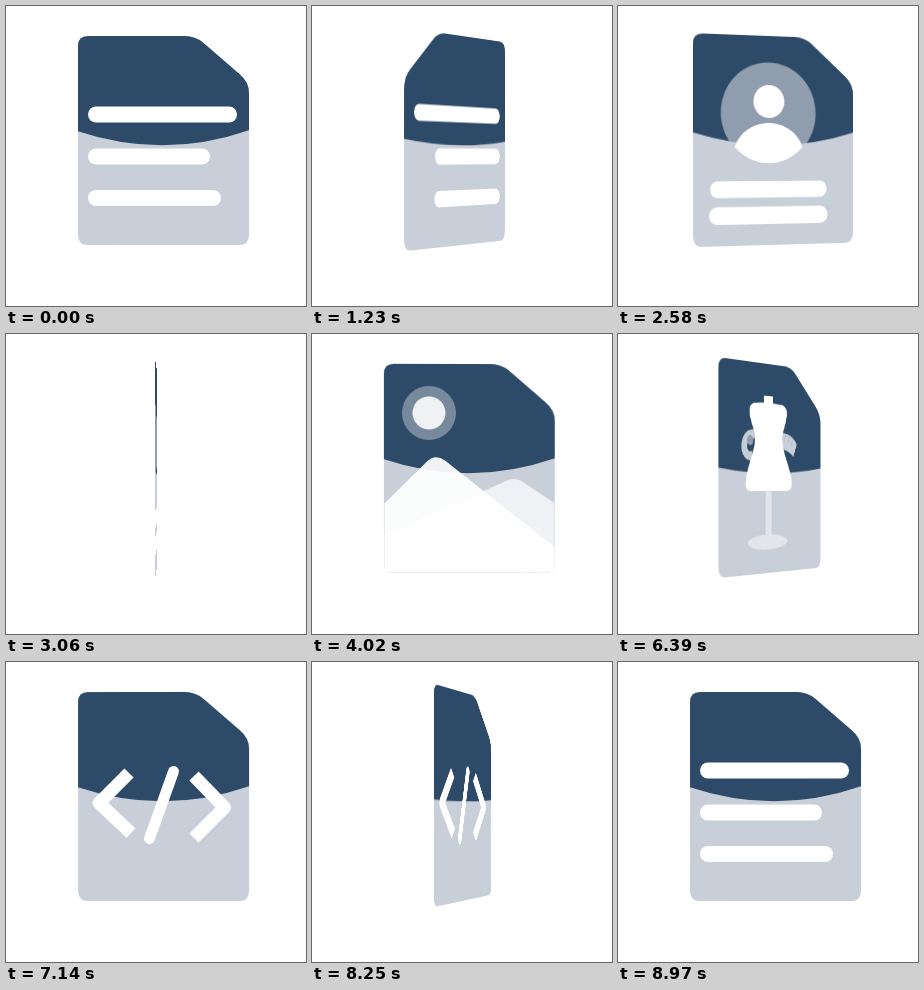
Write an HTML page that moves like this. It is 300x300 px and loops after 9 s.

```html
<!DOCTYPE html>
<html lang="en">
<head>
<meta charset="utf-8">
<title>Turning file card</title>
<style>
html, body { margin: 0; width: 100%; height: 100%; overflow: hidden; background: #fff; }
#stage { position: relative; width: 300px; height: 300px; perspective: 1150px; perspective-origin: 150px 150px; }
#card { position: absolute; left: 0; top: 0; width: 300px; height: 300px; transform-origin: 150px 150px; will-change: transform; }
.face { display: none; }
.face.on { display: inline; }
.stroke { fill: none; stroke: #fff; stroke-width: 13; stroke-linecap: butt; stroke-linejoin: round; }
</style>
</head>
<body>
<div id="stage">
<svg id="card" viewBox="0 0 300 300">
  <defs>
    <clipPath id="sheet">
      <path d="M82 30H179Q189 30 197 36.500L234 68.500Q243 76 243 87V229Q243 239 233 239H82Q72 239 72 229V40Q72 30 82 30Z"/>
    </clipPath>
  </defs>
  <g clip-path="url(#sheet)">
    <rect x="72" y="30" width="171" height="209" fill="#c9cfd8"/>
    <path id="top" fill="#2d4a68"/>
  </g>

  <g class="face" fill="#fff">
    <rect class="bar" x="82" y="100.500" height="16" rx="8"/>
    <rect class="bar" x="82" y="142.500" height="16" rx="8"/>
    <rect class="bar" x="82" y="184" height="16" rx="8"/>
  </g>

  <g class="face" fill="#fff">
    <circle cx="151" cy="107" r="50.500" fill="#c9cfd8" opacity=".63"/>
    <circle cx="151" cy="95.500" r="16.500"/>
    <path d="M115 141C120 126 135 117 151 117S182 126 187 141A48 48 0 0 1 115 141Z"/>
    <rect x="89.500" y="175" width="124" height="16.500" rx="8"/>
    <rect x="88.500" y="200.500" width="126" height="17.500" rx="8.500"/>
  </g>

  <g class="face" clip-path="url(#sheet)">
    <circle cx="117" cy="79" r="27" fill="#fff" opacity=".35"/>
    <circle cx="117" cy="79" r="16.500" fill="#eff1f3"/>
    <path d="M72.500 200L192 148Q202 142 211 148L242.500 169V238.500H72.500Z" fill="#eff1f4"/>
    <path d="M72.500 169.500L115 127.500Q123 119.500 133 126.500L242.500 213V238.500H72.500Z" fill="#fff" opacity=".93"/>
  </g>

  <g class="face">
    <path d="M129 101C107 98 106 126 125 122" fill="none" stroke="#c5ccd5" stroke-width="9"/>
    <circle cx="121" cy="107" r="5" fill="#8f9dae"/>
    <path d="M168 98Q190 97 199.500 109L193.500 122Q184 115 170 114Z" fill="#c9cfd8"/>
    <path d="M180 99L178 106M187 101L184 108M193 104L189 111" stroke="#aab4c1" stroke-width="1"/>
    <rect x="146" y="155" width="10" height="52" fill="#e2e5e9"/>
    <ellipse cx="150" cy="208" rx="33" ry="7.500" fill="#e2e5e9"/>
    <path d="M143 62H158V69L175 70Q183 72 182 80C180 91 174 97 174 105C175 119 187 132 190.500 146Q192 157 182 157H123Q112 157 114 146C117 131 128 119 129 105C129 97 122 91 120 80Q119 72 127 70L143 69Z" fill="#fff"/>
  </g>

  <g class="face">
    <path class="stroke bracket" d="M123 111L93 141L125 171"/>
    <path class="stroke" d="M167.500 109.500L143.500 176.500" style="stroke-width:11;stroke-linecap:round"/>
    <path class="stroke bracket" d="M188 114L218.500 145.500L188 176"/>
  </g>
</svg>
</div>
<script>
const LOOP = 9000, CYCLE = 1800, START = 262, TURN = 1560;
const card = document.getElementById('card');
const topHalf = document.getElementById('top');
const faces = [...document.querySelectorAll('.face')];
const brackets = [...document.querySelectorAll('.bracket')];
const bars = [...document.querySelectorAll('.bar')];
const barSizes = [[149, 3], [122, 9], [133, 19]]; // full width, shrink

const clamp = v => Math.min(1, Math.max(0, v));
const smooth = v => { v = clamp(v); return v * v * (3 - 2 * v); };
const bez = (u, a, b) => 3 * (1 - u) * (1 - u) * u * a + 3 * (1 - u) * u * u * b + u * u * u;

// Slow start, very fast middle, soft landing.
function ease(x) {
  if (x <= 0 || x >= 1) return clamp(x);
  let lo = 0, hi = 1;
  for (let i = 0; i < 30; i++) {
    const mid = (lo + hi) / 2;
    if (bez(mid, 1, .27) < x) lo = mid; else hi = mid;
  }
  return bez(lo, 0, 1);
}

// The dark half's lower edge flattens as the card turns away.
function drawTop(turn) {
  const sag = 14.5 * Math.cos(turn * 2 * Math.PI) ** 2;
  const low = 139.3;
  topHalf.setAttribute('d', `M72 30H243V${low - sag - .5}Q157.500 ${low + sag} 72 ${low - sag + .5}Z`);
}

function draw(t) {
  const since = (t - START + LOOP) % LOOP;
  const turn = ease(since % CYCLE / TURN);
  const shown = (Math.floor(since / CYCLE) + (turn >= .75 ? 1 : 0)) % faces.length;
  card.style.transform = `rotateY(${turn * 360}deg)`;
  drawTop(turn);
  faces.forEach((f, i) => f.classList.toggle('on', i === shown));

  const shrink = t < 4500 ? smooth((t - 30) / 1200) : 1 - smooth((t - 8400) / 570);
  bars.forEach((b, i) => b.setAttribute('width', barSizes[i][0] - barSizes[i][1] * shrink));

  const bob = 3 * (Math.cos((t - 7140) / 1200 * 2 * Math.PI) - 1);
  brackets.forEach((b, i) => b.setAttribute('transform', `translate(0 ${i ? bob : -bob})`));
}

const t0 = performance.now();
function tick() {
  draw((performance.now() - t0) % LOOP);
  requestAnimationFrame(tick);
}
draw(0);
requestAnimationFrame(tick);
</script>
</body>
</html>
```
